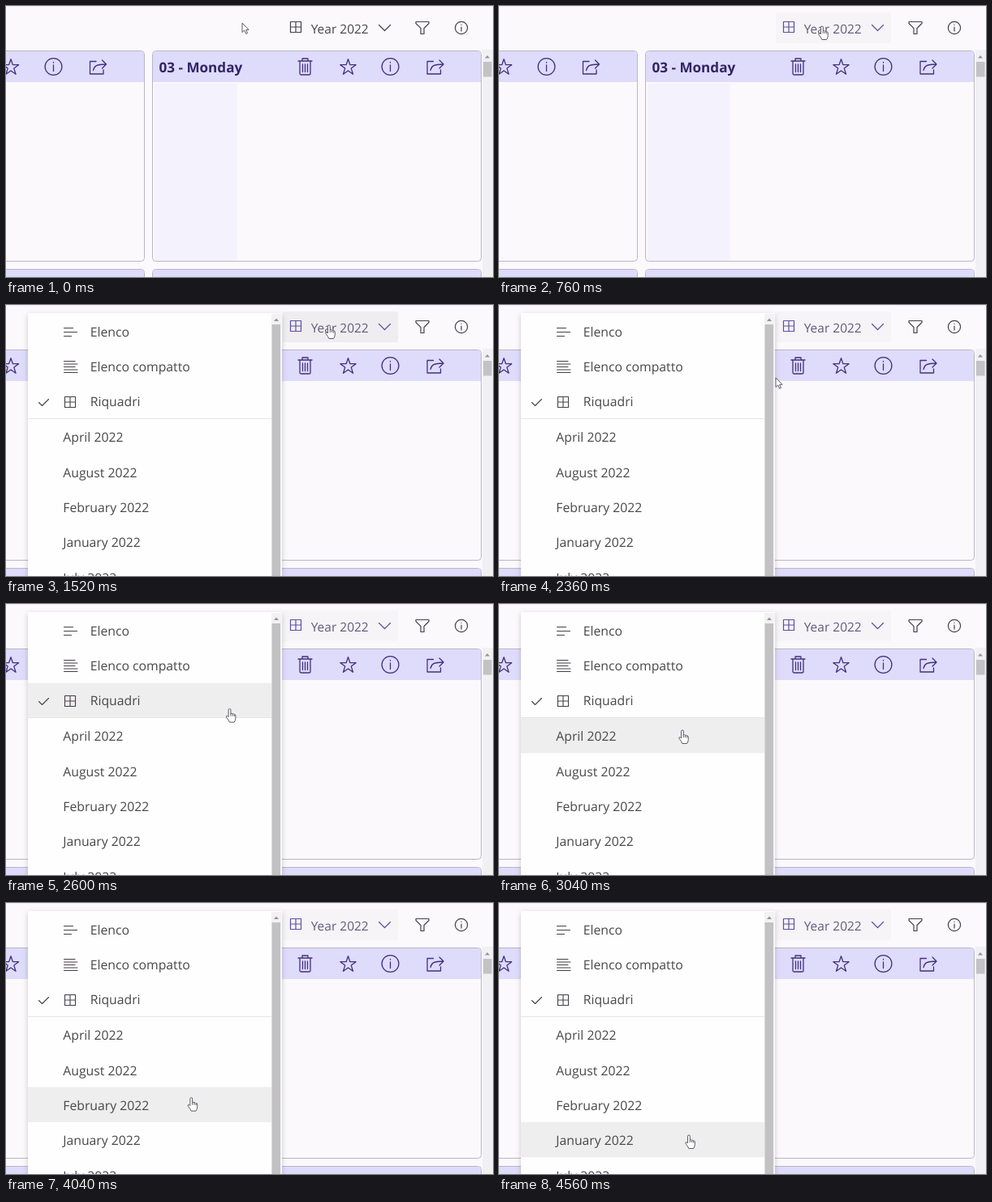
Recreate the animation shown at these times as an HTML page. Size 600 px wide and 335 px high, loop 4960 ms.

```html
<!DOCTYPE html>
<html lang="en">
<head>
<meta charset="utf-8">
<title>View menu</title>
<style>
  html, body { margin: 0; width: 100%; height: 100%; overflow: hidden; background: #fbf9fc; }
  svg { display: block; width: 100%; height: 100%; }
  text { font: 15.75px "Open Sans", "Noto Sans", sans-serif; fill: #484848; text-rendering: geometricPrecision; }
  .icon { fill: none; stroke: #42317f; stroke-width: 1.3; stroke-linejoin: round; stroke-linecap: round; }
  .plain { stroke: #454149; stroke-width: 1.2; }
  #menu .icon { stroke-width: 1.1; }
  .card { fill: #fbf9fc; stroke: #b9b7c4; }
  .head { fill: #dfdbfb; }
  #title { font-size: 17.1px; font-weight: 700; fill: #322566; }
  #label { font-size: 15.5px; }
  .active #label { fill: #625c7c; }
  .active .icon { stroke: #5b50a0; }
  #pointer path { fill: #fff; stroke: #5d5964; stroke-width: 1; stroke-linejoin: round; }
</style>
</head>
<body>
<svg viewBox="0 0 600 335">
  <defs>
    <filter id="shadow" x="-10%" y="-10%" width="120%" height="120%">
      <feDropShadow dx="0" dy="2" stdDeviation="3" flood-opacity=".2"/>
    </filter>
    <path id="star" d="M0-10 2.4-3H9.6L3.8 1.4 6 8.6 0 4.300-6 8.600-3.800 1.400-9.600-3H-2.400Z"/>
    <g id="info"><circle r="10.4"/><path d="M0-2V5.5M0-5.5V-5"/></g>
    <path id="share" d="M-2-6.500H-9.500V9H7V4M-5.500 4.500C-4.500-1-1-3 10-3M5.500-8 10.500-3 5.500 2"/>
    <path id="trash" d="M-8.5-7H8.5M-3.5-7V-10H3.5V-7M-6.5-7V8.5Q-6.5 10-5 10H5Q6.5 10 6.5 8.5V-7M-3-3V6.5M0-3V6.5M3-3V6.5"/>
    <path id="grid" d="M-6.5-6.5H6.5V6.5H-6.5ZM0-6.5V6.5M-6.5 0H6.5"/>
  </defs>

  <rect width="600" height="335" fill="#fbf9fc"/>
  <rect width="600" height="1" fill="#f1eff3"/>

  <g id="button">
    <rect id="buttonFill" x="341" y="8" width="142" height="38"/>
    <use href="#grid" class="icon plain" x="357" y="26"/>
    <text id="label" x="375.700" y="34">Year 2022</text>
    <path class="icon plain" d="M459.5 23.5 466.5 30.5 473.5 23.5"/>
  </g>
  <path class="icon plain" d="M505 19.500H521V21.500L515 27.500V34.500H511V27.500L505 21.500Z"/>
  <g class="icon plain"><circle cx="561" cy="27" r="7.6"/><path d="M561 26V31M561 23V23.3"/></g>

  <g id="cards"></g>
  <rect x="183" y="96" width="101.5" height="218.5" fill="#f4f2fd"/>
  <text id="title" x="188.5" y="81.5">03 - Monday</text>
  <g class="icon">
    <use href="#star" x="6" y="75.7"/>
    <use href="#info" x="58.5" y="75"/>
    <use href="#share" x="113" y="75"/>
    <use href="#trash" x="368.5" y="75"/>
    <use href="#star" x="421.5" y="75.7"/>
    <use href="#info" x="473.5" y="75"/>
    <use href="#share" x="528.5" y="75"/>
  </g>

  <rect x="587" y="54" width="13" height="281" fill="#f1f0f2"/>
  <path d="M590 64.5 593 61 596 64.5Z" fill="#96949a"/>
  <rect x="588" y="69" width="10.5" height="18.5" fill="#c3c2c4"/>

  <g id="menu">
    <rect x="27" y="10" width="313" height="345" rx="2" fill="#fefefe" filter="url(#shadow)"/>
    <rect id="hover" x="27" width="300" height="43.5" fill="#efeeef"/>
    <path d="M27 140.5H327" stroke="#e6e5e7"/>
    <rect x="327" y="11" width="12.5" height="324" fill="#f3f2f3"/>
    <path d="M330 20 333 16.5 336 20Z" fill="#96949a"/>
    <rect x="327.5" y="24" width="10.5" height="311" fill="#c2c1c3"/>
    <path class="icon plain" d="M71.5 28.5H82.5M71.5 33.5H87.5M71.5 38.5H80.5"/>
    <path class="icon plain" d="M71.5 69.5H85M71.5 73H88M71.5 76.5H85M71.5 80H88M71.5 83.5H88"/>
    <path class="icon plain" d="M40.5 120.5 44.5 124.5 52.5 116.5"/>
    <use href="#grid" class="icon plain" x="79" y="120"/>
  </g>

  <g id="pointer">
    <path id="arrow" d="M0 0V11.5L2.7 9 4.6 13.3 6.5 12.5 4.7 8.3H8Z"/>
    <path id="hand" d="M-1.5 8V1.2Q-1.5 0 0 0T1.3 1.2V6Q2.7 5 3.6 6.3 5 5.6 5.7 7 7.3 6.6 7.3 8.5V11.5Q7.3 14 5.6 16.5H-.2Q-1.2 13.5-4 10.5-4.6 8.5-3 8.5L-1.5 10ZM1.3 6V9M3.6 6.5V9M5.7 7.2V9.5"/>
  </g>
</svg>
<script>
const LOOP = 4960, STEP = 40, PRESS = 1120, OPEN = 1200;
const ROW_TOP = 11, ROW_HEIGHT = 43.3;
const $ = id => document.getElementById(id);

// Pointer hot spot: time, x, y
const path = [
  [0, 291, 21], [200, 302, 45], [360, 345, 65], [560, 407, 46], [760, 398, 25],
  [1640, 398, 25], [2000, 383, 50], [2360, 341, 90], [2760, 232, 156],
  [3040, 226, 156], [3320, 226, 168], [3560, 224, 197], [4440, 232, 277], [4560, 234, 287], [LOOP, 234, 287]
];

const card = (x, y) => `<rect class="card" x="${x}" y="${y}" width="405" height="260" rx="4"/>
  <path class="head" d="M${x + .5} ${y + 38.5}V${y + 4}q0-3.5 3.5-3.5H${x + 401}q3.5 0 3.5 3.5V${y + 38.5}Z"/>`;
$('cards').innerHTML = [55.5, 325.5].map(y => card(-234.5, y) + card(180.5, y)).join('');

const modes = ['Elenco', 'Elenco compatto', 'Riquadri'];
const months = ['April 2022', 'August 2022', 'February 2022', 'January 2022', 'July 2022'];
const column = (labels, x, y) => labels.map((label, i) =>
  `<text x="${x}" y="${y + i * ROW_HEIGHT}">${label}</text>`).join('');
$('menu').insertAdjacentHTML('beforeend', column(modes, 103.7, 38.8) + column(months, 70.3, 169.3));

function pointerAt(t) {
  const i = path.findIndex(key => key[0] > t);
  const [t0, x0, y0] = path[i - 1], [t1, x1, y1] = path[i];
  const p = (t - t0) / (t1 - t0);
  return [x0 + (x1 - x0) * p, y0 + (y1 - y0) * p];
}

const show = (id, visible) => $(id).setAttribute('display', visible ? 'inline' : 'none');

function draw(t) {
  const [x, y] = pointerAt(t);
  const open = t >= OPEN;
  const onButton = x >= 341 && x <= 483 && y >= 8 && y <= 46;
  const onMenu = open && x >= 27 && x < 327 && y >= ROW_TOP;
  const dark = onButton && t >= PRESS;

  $('button').classList.toggle('active', onButton || open);
  $('buttonFill').setAttribute('fill', dark ? '#efedf0' : onButton || open ? '#f6f4f7' : 'none');
  show('menu', open);
  show('hover', onMenu);
  const row = Math.floor((y - ROW_TOP) / ROW_HEIGHT);
  $('hover').setAttribute('y', ROW_TOP + row * ROW_HEIGHT);

  show('hand', onButton || onMenu);
  show('arrow', !(onButton || onMenu));
  $('pointer').setAttribute('transform', `translate(${x} ${y})`);
}

function frame() {
  draw(Math.floor(performance.now() % LOOP / STEP) * STEP);
  requestAnimationFrame(frame);
}
frame();
</script>
</body>
</html>
```
